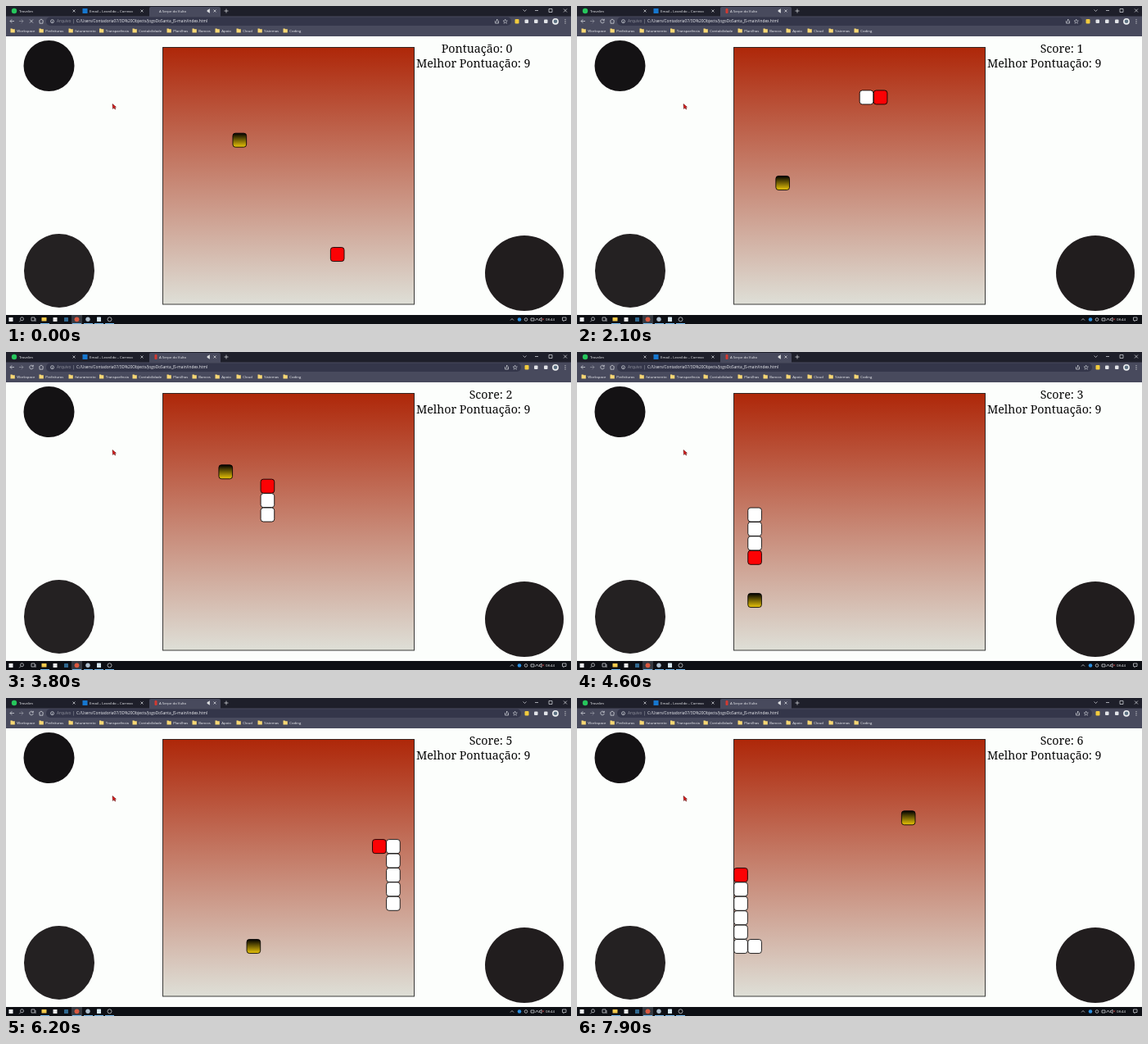
An HTML page that plays this animation: 690 px wide and 388 px high, repeating every 8 s.

```html
<!DOCTYPE html>
<html lang="pt-BR">
<head>
<meta charset="utf-8">
<title>A Serpe do Vulto</title>
<style>
  html, body { margin: 0; width: 100%; height: 100%; overflow: hidden; background: #fcfefc; }
  svg { display: block; width: 690px; height: 388px; }
  .ui { font: 4.3px "Open Sans", "Noto Sans", sans-serif; fill: #f1f2f5; }
  .url { font-size: 4.8px; }
  .score { font: 14.2px "Noto Serif", serif; fill: #080808; text-anchor: end; }
  .line { fill: none; stroke: #dfe1e6; stroke-width: .7; }
</style>
</head>
<body>
<svg id="stage" viewBox="0 0 690 388" xmlns="http://www.w3.org/2000/svg">
  <defs>
    <linearGradient id="sky" x2="0" y2="1">
      <stop stop-color="#ae2709"/><stop offset="1" stop-color="#dedfd7"/>
    </linearGradient>
    <linearGradient id="gold" x2="0" y2="1">
      <stop stop-color="#000"/><stop offset="1" stop-color="#eac508"/>
    </linearGradient>
  </defs>
</svg>
<script>
const LOOP = 8000, STEP = 62, CELLS = 18;
const BOARD = { x: 191.5, y: 50.5, w: 307, h: 313.5 };
const ROUTE = "R14 U1 L3 U10 R16 D8 R4 U6 L6 D9 R15 U7 L8 D7 L8 U6";
const FOODS = [[5, 6], [3, 9], [4, 5], [1, 14], [15, 7], [6, 14], [12, 5]];
const DIRS = { R: [1, 0], L: [-1, 0], U: [0, -1], D: [0, 1] };
const BAR = "#484a5d";

const stage = document.getElementById("stage");

function add(tag, attrs, text) {
  const el = document.createElementNS("http://www.w3.org/2000/svg", tag);
  for (const key in attrs) el.setAttribute(key, attrs[key]);
  if (text) el.textContent = text;
  stage.append(el);
  return el;
}
const box = (x, y, width, height, fill, rx = 0) => add("rect", { x, y, width, height, fill, rx });
const dot = (cx, cy, r, fill) => add("circle", { cx, cy, r, fill });
const ring = (cx, cy, r) => add("circle", { cx, cy, r, class: "line" });
const path = (d, attrs = {}) => add("path", { d, class: "line", ...attrs });
const label = (x, y, text, cls = "ui") => add("text", { x, y, class: cls }, text);
const show = (el, on) => el.setAttribute("visibility", on ? "visible" : "hidden");

function drawTabs() {
  box(0, 0, 690, 13, "#1e1f2a");
  path("M175 13V3q0-2 2-2H260q2 0 2 2V13Z", { style: `fill:${BAR};stroke:none` });
  dot(10, 6, 3.2, "#26c65c");
  label(16, 7.6, "Trovelim");
  box(93.5, 3, 6, 6, "#1677cf");
  label(102, 7.6, "Email – Leonildo – Correvo");
  label(187, 7.6, "A Serpe do Vulto");
  for (const x of [83, 166, 255]) path(`M${x - 1.5} 4.5l3 3m0-3l-3 3`);
  path("M246 5h1l1.5-1.3v4.6L246.8 7H246Z", { style: "fill:#ddd" });
  path("M266.5 6h5M269 3.5v5");
  path("M631.5 4.5l2 2 2-2M646 5.5h4M663 3.5h4v4h-4ZM681 3.5l4 4m0-4l-4 4");
}

function drawToolbar() {
  box(0, 12.5, 690, 25, BAR);
  path("M10 18.5H5m2.3-2.3L5 18.5l2.3 2.3");
  path("M16 18.5h5m-2.3-2.3l2.3 2.3-2.3 2.3", { opacity: .5 });
  path("M40 18.5l3-2.5 3 2.5M41 18.3v2.9h4v-2.9");
  for (const x of [647, 659]) box(x - 2, 16.5, 4.5, 4.5, "#e2e4e8", 1);
  dot(671, 18.8, 3.9, "#eceef0");
  dot(671, 18.8, 2.3, "#5c7182");
  for (const y of [16.5, 18.7, 20.9]) dot(683, y, .6, "#ddd");
}

function drawAddress() {
  ring(56.5, 18.7, 2);
  path("M56.5 18.5v1.3");
  label(62, 20.4, "Arquivo", "ui url").setAttribute("opacity", .5);
  path("M82.5 16v5.5", { opacity: .4 });
  label(86, 20.4, "C:/Users/Contadoria07/3D%20Objects/JogoDoSanta_JS-main/index.html", "ui url");
}

function drawBookmarks() {
  const marks = [[8, "Workspace"], [43, "Prefeituras"], [79, "faturamento"], [116.5, "Transparência"],
    [157, "Contabilidade"], [199, "Planilhas"], [230, "Bancos"], [258, "Apoio"],
    [284, "Cloud"], [310, "Sistemas"], [341, "Coding"]];
  for (const [x, name] of marks) {
    path(`M${x - 2.5} 27.5h2l.7.8h2.6v4.2h-5.3Z`, { style: "fill:#f7d774;stroke:none" });
    label(x + 5.3, 31.5, name);
  }
}

function drawPage() {
  box(0, 37, 690, 340, "#fcfefc");
  dot(52.5, 73, 31, "#141214");
  add("ellipse", { cx: 65, cy: 323, rx: 43, ry: 45, fill: "#242122" });
  add("ellipse", { cx: 633, cy: 326, rx: 48, ry: 46, fill: "#211d1e" });
  path("M130 119.5l.5 6 1.3-1.4 1.3 2 .8-.6-1.2-1.9 1.7-.3Z",
    { style: "fill:#e01818;stroke:#400;stroke-width:.5" });
  add("rect", { x: BOARD.x, y: BOARD.y, width: BOARD.w, height: BOARD.h,
    fill: "url(#sky)", stroke: "#000", "stroke-width": 1, "stroke-opacity": .75 });
  label(640.5, 74.5, "Melhor Pontuação: 9", "score");
}

function drawTaskbar() {
  box(0, 377, 690, 11, "#0d0f14");
  box(80, 377, 13, 11, "#353a42");
  box(3.5, 380, 5, 5, "#f1f3f5");
  ring(19.5, 381.8, 2);
  path("M18 383.5l-1.7 1.8");
  path("M31 380h4v4h-4ZM36 381v4");
  box(43.5, 380, 6, 4.5, "#f3c94c", .5);
  box(57.5, 380, 5, 5, "#e9e9e9", .5);
  box(71, 380, 5, 5, "#31688f", .5);
  dot(86.5, 382.3, 2.9, "#d9583f");
  dot(100, 382.3, 2.7, "#aebfce");
  box(111, 379.5, 5, 5.5, "#d7e7f0", .5);
  ring(126.5, 382.3, 2.5);
  for (const x of [42, 81, 95, 108, 121]) box(x, 387, 11, 1, "#76b9ed");
  path("M616 383.5l2-2 2 2");
  dot(627, 382.5, 2.3, "#2b8fe0");
  ring(635, 382.5, 1.8);
  path("M641 381h4v3h-4ZM646.5 384l2-3 2 3");
  path("M651.500 381.5h1l1.5-1.3v4.6l-1.500-1.3h-1Z");
  path("M655 381.3l2 2m0-2l-2 2", { style: "stroke:#e04848" });
  label(659, 384.2, "08:44");
  path("M679.5 380h4.5v3.5h-2l-1.2 1.2v-1.2h-1.3Z");
}

// Walks the route once, noting the head's cell and the score after each step.
function playGame() {
  let [x, y, score] = [12, 14, 0];
  const log = [{ x, y, score }];
  for (const leg of ROUTE.split(" ")) {
    const [dx, dy] = DIRS[leg[0]];
    for (let i = 0; i < +leg.slice(1); i++) {
      x = (x + dx + CELLS) % CELLS;
      y = (y + dy + CELLS) % CELLS;
      if (x === FOODS[score][0] && y === FOODS[score][1]) score++;
      log.push({ x, y, score });
    }
  }
  return log;
}

const CW = BOARD.w / CELLS, CH = BOARD.h / CELLS;
const makeCell = fill => add("rect", { width: CW - .4, height: CH - .4, rx: 3.2,
  fill, stroke: "#000", "stroke-width": 1, "stroke-opacity": .85 });

function place(cell, x, y) {
  cell.setAttribute("x", BOARD.x + x * CW + .2);
  cell.setAttribute("y", BOARD.y + y * CH + .2);
}

drawTabs();
drawToolbar();
const pill = box(49, 13.5, 580, 10.5, "#34364a", 5);
drawAddress();
drawBookmarks();
drawPage();
drawTaskbar();

const favicon = box(181.5, 3, 3, 6, "#d33a32", 1);
const stopMark = path("M29 16.5l4 4m0-4l-4 4");
const reloadMark = path("M33 17.3a2.3 2.3 0 1 0 .3 1.8M33.3 15.8v1.9h-1.9");
const puzzle = box(633.5, 16.5, 4.5, 4.5, "#e2e4e8", 1);
const sliding = [
  path("M609.5 18v3h4v-3M611.5 19.5V16l1.5 1.5"),
  path("M619 18h2l.7-2 .7 2h2l-1.6 1.3.6 2-1.7-1.2-1.7 1.2.6-2Z", { opacity: .7 }),
  box(633.5, 16, 5, 5.5, "#f2cb3d", 1),
];
const scoreText = label(618.5, 56.5, "", "score");
const food = makeCell("url(#gold)");
const snake = FOODS.map((_, i) => makeCell(i ? "#fff" : "#fc0204"));
const game = playGame();

function render(t) {
  const loading = t < 200, early = t < 2800;
  const shift = early ? -12 : 0;
  show(stopMark, loading);
  show(reloadMark, !loading);
  show(favicon, !loading);
  show(puzzle, early);
  pill.setAttribute("width", 580 + shift);
  for (const icon of sliding) icon.setAttribute("transform", `translate(${shift})`);

  const n = Math.min(game.length - 1, Math.floor(t / STEP + .05));
  const { score } = game[n];
  scoreText.textContent = score ? `Score: ${score}` : "Pontuação: 0";
  place(food, ...FOODS[score]);
  snake.forEach((cell, i) => {
    const on = i <= score && i <= n;
    show(cell, on);
    if (on) place(cell, game[n - i].x, game[n - i].y);
  });
}

const start = performance.now();
function tick() {
  render((performance.now() - start) % LOOP);
  requestAnimationFrame(tick);
}
tick();
</script>
</body>
</html>
```
